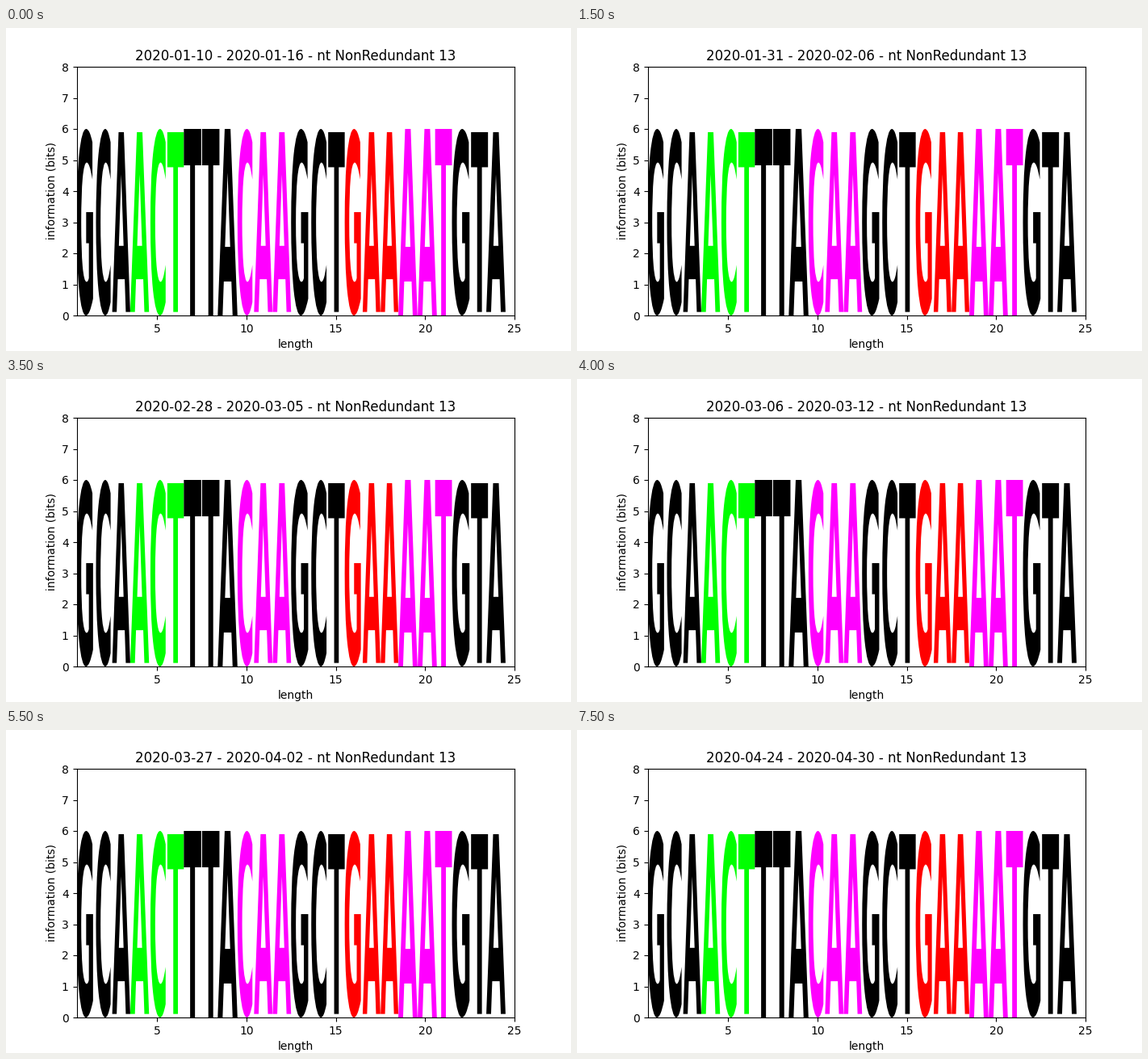
These frames come from a looping animation (700 px wide and 400 px high, 8000 ms). A matplotlib script:

```python
import matplotlib.pyplot as plt
import numpy as np
from matplotlib.animation import FuncAnimation
from matplotlib.patches import PathPatch
from matplotlib.textpath import TextPath
from matplotlib.transforms import Affine2D

plt.rcParams["font.family"] = "DejaVu Sans"

WEEKS = 16
STEP_MS = 500
FIRST_DAY = np.datetime64("2020-01-10")
CODON_WIDTH = 3
BITS = 6
CODONS = [
    ("GCA", "black"),
    ("ACT", "lime"),
    ("TTA", "black"),
    ("CAA", "magenta"),
    ("GCT", "black"),
    ("GAA", "red"),
    ("AAT", "magenta"),
    ("GTA", "black"),
]


def draw_codon(ax, text, x, color):
    """Draw a codon whose outline fills its slot from the baseline up."""
    font = {"family": "DejaVu Sans", "weight": "bold"}
    path = TextPath((0, 0), text, size=100, prop=font)
    box = path.get_extents()
    fit = (
        Affine2D()
        .translate(-box.x0, -box.y0)
        .scale(CODON_WIDTH / box.width, BITS / box.height)
        .translate(x, 0)
    )
    ax.add_patch(PathPatch(fit.transform_path(path), fc=color, lw=0))


def week_title(week):
    start = FIRST_DAY + 7 * week
    return f"{start} - {start + 6} - nt NonRedundant 13"


fig, ax = plt.subplots(figsize=(7, 4), dpi=100)
for i, (text, color) in enumerate(CODONS):
    draw_codon(ax, text, 0.5 + CODON_WIDTH * i, color)

ax.set_xlim(0.5, 25)
ax.set_ylim(0, 8)
ax.set_xticks(range(5, 26, 5))
ax.set_yticks(range(9))
ax.set_xlabel("length")
ax.set_ylabel("information (bits)")
title = ax.set_title(week_title(0))


def update(week):
    title.set_text(week_title(week))
    return (title,)


anim = FuncAnimation(fig, update, frames=WEEKS, interval=STEP_MS,
                     repeat=True, repeat_delay=0)
plt.show()
```
